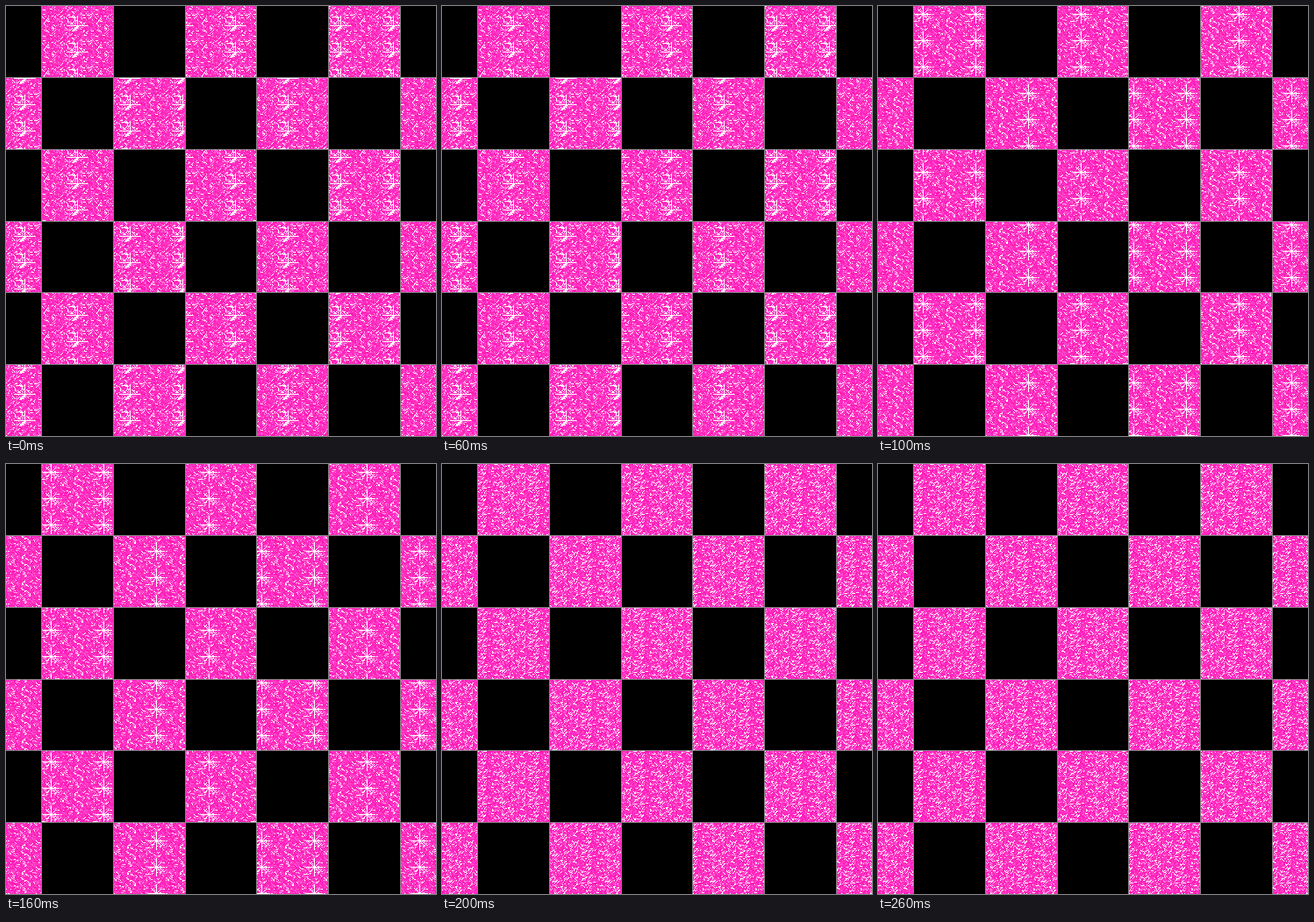
Animation, 490 px wide and 490 px high, one loop 0.3 s. Source, as an HTML page with a canvas:

```html
<!DOCTYPE html>
<html lang="en">
<head>
<meta charset="utf-8">
<title>Glitter checkerboard</title>
<style>
html, body { margin: 0; width: 100%; height: 100%; overflow: hidden; background: #000; }
canvas { display: block; width: 490px; height: 490px; }
</style>
</head>
<body>
<canvas id="stage" width="490" height="490"></canvas>
<script>
const SIZE = 490, CELL = SIZE / 6, TILE_W = 60, TILE_H = 30, STEP = 100;
const ctx = document.getElementById('stage').getContext('2d');
const PINKS = ['#ff14b4', '#ff38c8', '#ff5ed2', '#fa1ca8', '#ff4ccc', '#ff20c4'];

function seeded(seed) {
  return () => {
    seed = (seed + 0x6d2b79f5) | 0;
    let t = Math.imul(seed ^ (seed >>> 15), 1 | seed);
    t = (t + Math.imul(t ^ (t >>> 7), 61 | t)) ^ t;
    return ((t ^ (t >>> 14)) >>> 0) / 4294967296;
  };
}

function makeCanvas(w, h) {
  const canvas = document.createElement('canvas');
  canvas.width = w;
  canvas.height = h;
  return canvas;
}

// One repeating patch of glitter; every dot wraps round its edges.
function makeTile({ seed, flecks, star }) {
  const tile = makeCanvas(TILE_W, TILE_H), g = tile.getContext('2d');
  const random = seeded(seed);
  const pick = n => Math.floor(random() * n);
  const dot = (x, y, color = '#fff') => {
    g.fillStyle = color;
    g.fillRect((x + TILE_W) % TILE_W, (y + TILE_H) % TILE_H, 1, 1);
  };
  const dash = (color, maxLength) => {
    const x = pick(TILE_W), y = pick(TILE_H);
    const length = 1 + pick(maxLength), slope = pick(3) - 1;
    for (let k = 0; k < length; k++) dot(x + k, y + slope * k, color);
  };
  g.fillStyle = '#ff2abe';
  g.fillRect(0, 0, TILE_W, TILE_H);
  for (let i = 0; i < 700; i++) dash(PINKS[pick(PINKS.length)], 3);
  for (let i = 0; i < flecks; i++) {
    dash('#ffa4e4', 2);
    dash('#fff', 3);
  }
  if (star) star(dot);
  return tile;
}

function cross(dot, x, y, left, right, up, down) {
  for (let k = -left; k <= right; k++) dot(x + k, y);
  for (let k = -up; k <= down; k++) dot(x, y + k);
}

// A cross with an open loop at its upper left and a thick tail below.
function brokenStar(dot) {
  const x = 21, y = 22;
  cross(dot, x, y, 12, 11, 11, 3);
  for (let k = 0; k < 6; k++) {
    dot(x - 9 + k, y - 10);
    if (k < 4) {
      dot(x - 11, y - 7 + k);
      dot(x - 8 + k, y - 2);
      dot(x - 3, y - 9 + k);
    }
  }
  for (let k = 0; k < 6; k++) {
    dot(x - k, y + 1 + k);
    dot(x + 1 - k, y + 1 + k);
    dot(x - 1 - k, y + 1 + k);
  }
}

function brightStar(dot) {
  const x = 51, y = 9;
  cross(dot, x, y, 9, 9, 10, 10);
  for (let k = -5; k <= 5; k++) {
    dot(x + k, y + k);
    dot(x + k, y - k);
  }
}

function makeScene(options) {
  const scene = makeCanvas(SIZE, SIZE), g = scene.getContext('2d');
  g.fillStyle = g.createPattern(makeTile(options), 'repeat');
  g.fillRect(0, 0, SIZE, SIZE);

  const columnEdge = i => Math.floor((i - 0.5) * CELL);
  const rowEdge = i => Math.floor(i * CELL);
  g.fillStyle = '#000';
  for (let row = 0; row < 6; row++) {
    for (let col = row % 2; col < 7; col += 2) {
      const x = columnEdge(col), y = rowEdge(row);
      g.fillRect(x, y, columnEdge(col + 1) - x, rowEdge(row + 1) - y);
    }
  }
  g.fillStyle = '#808080';
  for (let i = 1; i < 7; i++) {
    g.fillRect(columnEdge(i), 0, 1, SIZE);
    if (i < 6) g.fillRect(0, rowEdge(i), SIZE, 1);
  }
  return scene;
}

const scenes = [
  { seed: 71, flecks: 85, star: brokenStar },
  { seed: 1203, flecks: 85, star: brightStar },
  { seed: 5081, flecks: 105 }
].map(makeScene);

function render(time) {
  ctx.drawImage(scenes[Math.floor(time / STEP) % scenes.length], 0, 0);
}

const start = performance.now();
function tick() {
  render(performance.now() - start);
  requestAnimationFrame(tick);
}
tick();
</script>
</body>
</html>
```
